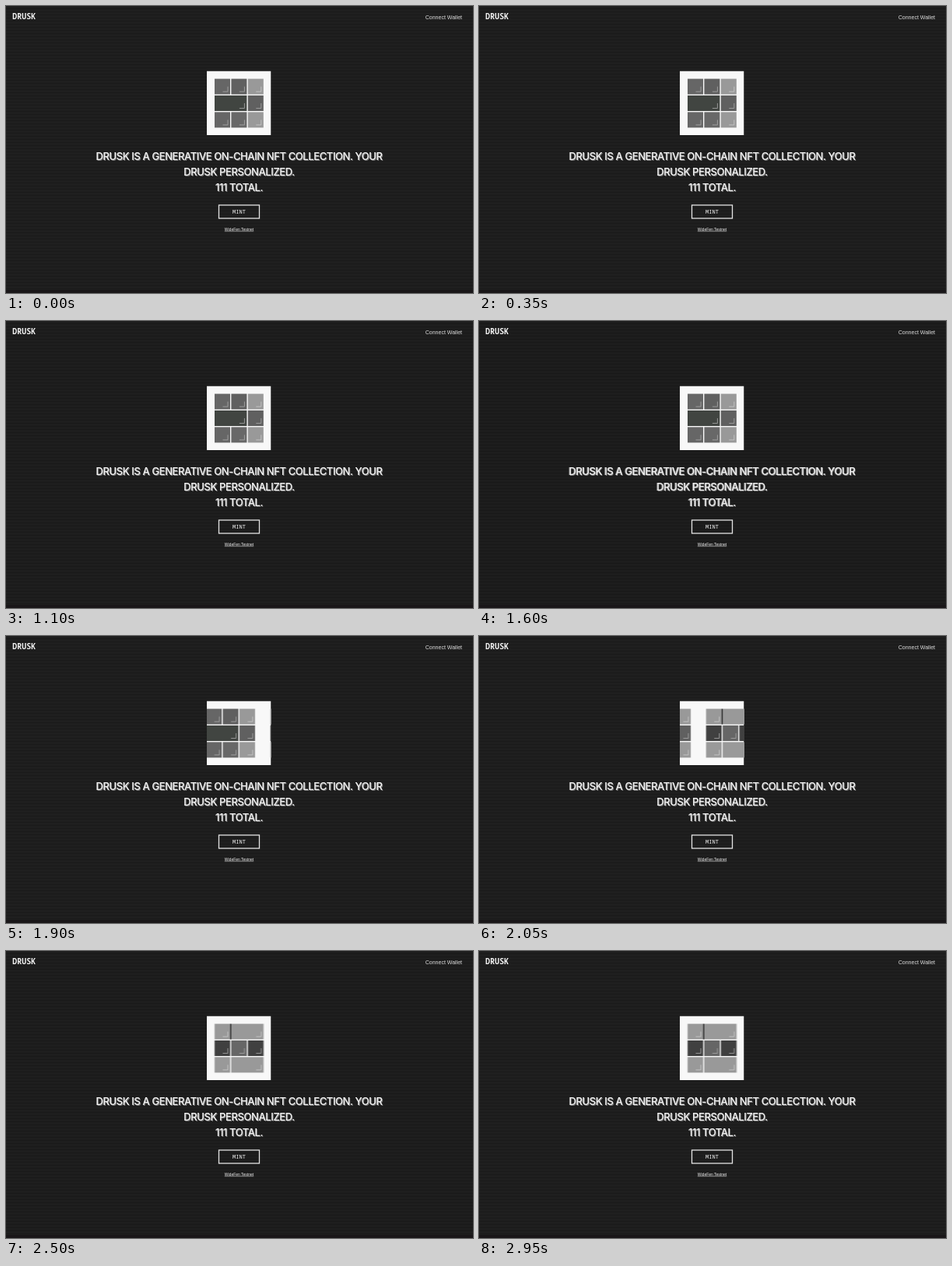
An HTML page for the animation above (3 s loop, 600 px wide and 369 px high).

```html
<!DOCTYPE html>
<html lang="en">
<head>
<meta charset="utf-8">
<title>Drusk</title>
<style>
  html, body { margin: 0; width: 100%; height: 100%; overflow: hidden; background: #1d1d1d; }
  .stage {
    position: relative; width: 600px; height: 369px; overflow: hidden;
    background: repeating-linear-gradient(#1f1f1f 0 3px, #1a1a1a 3px 4px);
  }
  .stage::after {
    content: ""; position: absolute; left: 0; right: 0; bottom: 0; height: 4px;
    background: #191618;
  }
  .flicker { position: absolute; inset: 0; background: #000; animation: flicker 3s step-end infinite; }
  svg { position: absolute; inset: 0; }
  h1 {
    position: absolute; left: 0; top: 183px; width: 599px; margin: 0;
    font: 500 13px/20px Inter, sans-serif; letter-spacing: -.4px;
    text-align: center; white-space: nowrap; color: #f1f1f1;
    animation: ghost 3s linear infinite;
  }
  .brand { font: 700 10px "Noto Sans Mono", monospace; }
  .wallet { font: 7px "Liberation Sans", Arial, sans-serif; }
  .mint { font: 500 7px "Noto Sans Mono", monospace; }
  .link { font: 5px "Liberation Sans", Arial, sans-serif; text-decoration: underline; }
  .track { animation: slide 3s infinite; }
  .dot { animation: dot 3s linear infinite; }

  @keyframes slide {
    0%, 61.333% { transform: translateX(0); animation-timing-function: ease; }
    78%, 100% { transform: translateX(-82.5px); }
  }
  @keyframes dot {
    0%, 20%, 31.667%, 100% { opacity: 0; }
    21.667%, 30% { opacity: 1; }
  }
  @keyframes flicker {
    0%, 60%, 95% { opacity: 0; }
    20%, 35%, 70% { opacity: .03; }
    50% { opacity: .07; }
  }
  @keyframes ghost {
    0%, 20%, 30%, 36%, 48%, 58%, 100% { text-shadow: 1px 1px 0 #777, 0 0 0 #777; }
    25%, 53.333% { text-shadow: .6px 1px 0 #777, -1px 0 0 #888; }
  }
</style>
</head>
<body>
<div class="stage">
  <div class="flicker"></div>
  <svg width="600" height="369" viewBox="0 0 600 369" fill="#f1f1f1">
    <defs><clipPath id="card"><rect x="258" y="83.5" width="82.5" height="82.5"/></clipPath></defs>
    <text class="brand" x="8.3" y="16.7">DRUSK</text>
    <text class="wallet" x="586" y="17" text-anchor="end" fill="#ddd">Connect Wallet</text>
    <g clip-path="url(#card)">
      <rect x="258" y="83.5" width="82.5" height="82.5" fill="#f8f8f8"/>
      <g class="track" id="track"></g>
    </g>
    <circle class="dot" cx="298" cy="124" r="2.8" fill="#b4b4b4"/>
    <rect x="273.5" y="256" width="52" height="17" fill="none" stroke="#e4e4e4" stroke-width="1.3"/>
    <text class="mint" x="299.5" y="267.3" text-anchor="middle">MINT</text>
    <text class="link" x="299.5" y="288.6" text-anchor="middle">WideFen Testnet</text>
  </svg>
  <h1>DRUSK IS A GENERATIVE ON-CHAIN NFT COLLECTION. YOUR<br>DRUSK PERSONALIZED.<br>111 TOTAL.</h1>
</div>
<script>
  const STEP = 21.4, CELL = 20, SLIDE = 82.5;

  // Each row lists [columns spanned, fill].
  const slides = [
    [
      [[1, '#666'], [1, '#606060'], [1, '#999']],
      [[2, '#414541'], [1, '#606060']],
      [[1, '#666'], [1, '#686868'], [1, '#999']]
    ],
    [
      [[1, '#999'], [2, '#999']],
      [[1, '#404040'], [1, '#666'], [1, '#404040']],
      [[1, '#999'], [2, '#999']]
    ]
  ];

  const track = document.getElementById('track');

  function add(tag, attrs) {
    const el = document.createElementNS('http://www.w3.org/2000/svg', tag);
    for (const key in attrs) el.setAttribute(key, attrs[key]);
    track.append(el);
  }

  function addCell(x, y, span, fill) {
    const width = CELL + (span - 1) * STEP;
    add('rect', { x, y, width, height: CELL, fill });
    add('path', {
      d: `M${x + width - 9.5} ${y + 16.5}h6.5v-6.5`,
      fill: 'none', stroke: fill === '#999' ? '#ccc' : '#aaa', 'stroke-width': 0.8
    });
  }

  slides.forEach((rows, s) => {
    const left = 268 + s * SLIDE;
    rows.forEach((cells, r) => {
      let col = 0;
      for (const [span, fill] of cells) {
        addCell(left + col * STEP, 93.6 + r * STEP, span, fill);
        col += span;
      }
    });
  });

  // Black divider in the second slide's top row.
  add('rect', { x: 268 + SLIDE + CELL, y: 93.6, width: 1.4, height: CELL, fill: '#111' });
</script>
</body>
</html>
```
